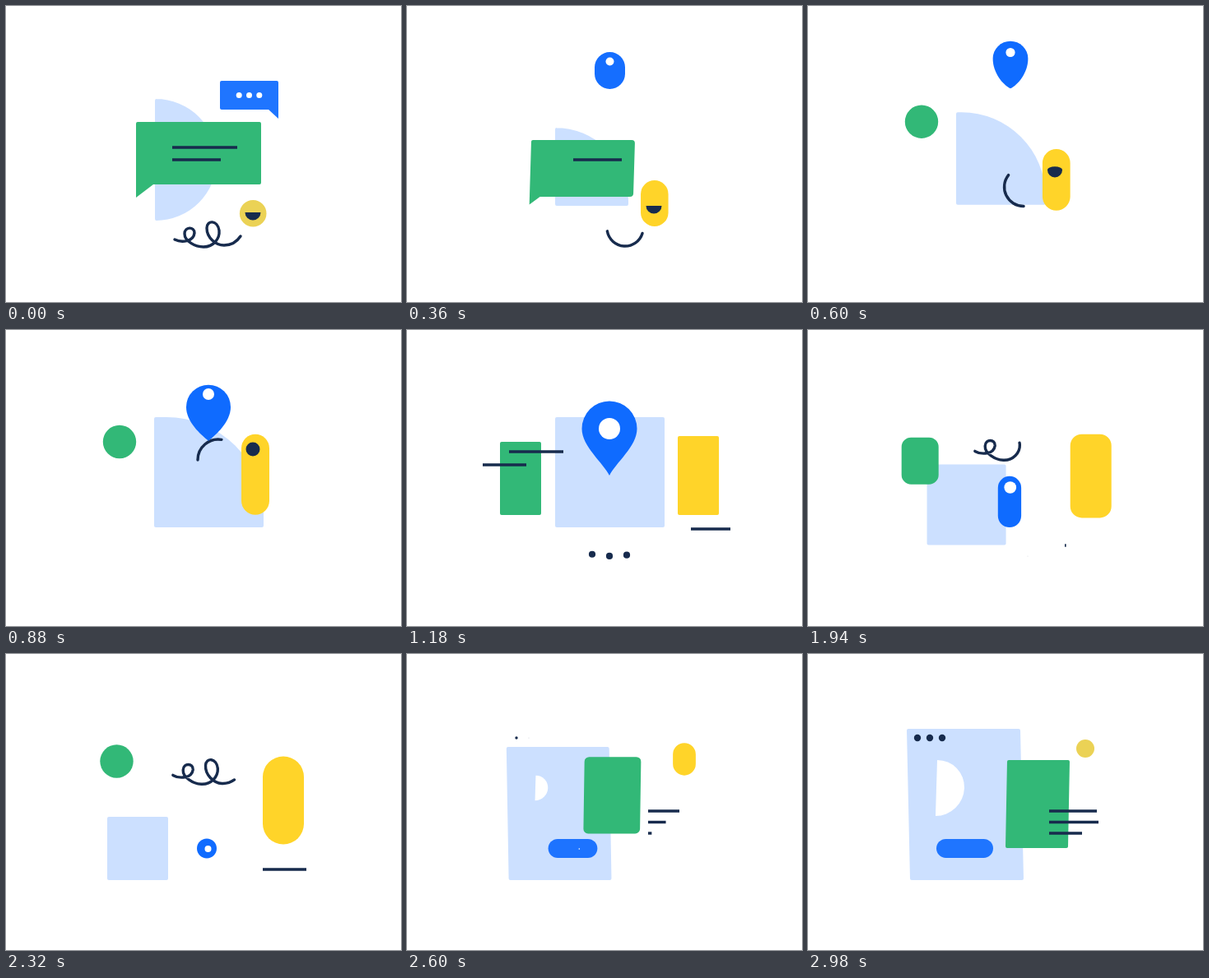
An HTML page for the animation above (3 s loop, 480 px wide and 360 px high).

```html
<!DOCTYPE html>
<html lang="en">
<head>
<meta charset="utf-8">
<title>Shape morph loop</title>
<style>
  html, body { margin: 0; width: 100%; height: 100%; overflow: hidden; background: #fff; }
  svg { display: block; width: 100vw; height: 100vh; }
  .ink { stroke: #172b4d; stroke-width: 3.4; fill: none; }
  .dark { fill: #172b4d; }
  .round { stroke-linecap: round; }
</style>
</head>
<body>
<svg id="stage" viewBox="0 0 480 360"></svg>
<script>
const LOOP = 3000;

// Every part moves between these beats; a pose is held from `from` to `to`.
const BEATS = {
  chat: { from: 0, to: 80 },
  lift: { from: 360, to: 360 },
  rise: { from: 550, to: 550 },
  drop: { from: 880, to: 880 },
  map: { from: 1150, to: 1520 },
  squeeze: { from: 1720, to: 1720 },
  rest: { from: 2150, to: 2360 },
  page: { from: 2700, to: LOOP }
};

const stage = document.getElementById('stage');
function set(el, attrs) {
  for (const key in attrs) el.setAttribute(key, attrs[key]);
}
function add(tag, attrs) {
  const el = document.createElementNS('http://www.w3.org/2000/svg', tag);
  set(el, attrs);
  return stage.appendChild(el);
}

const lerp = (a, b, u) => a + (b - a) * u;
function ramp(time, from, to) {
  const u = Math.min(1, Math.max(0, (time - from) / (to - from)));
  return u * u * (3 - 2 * u);
}
const rad = degrees => degrees * Math.PI / 180;
const polar = (x, y, r, degrees) => `${x + r * Math.cos(rad(degrees))} ${y + r * Math.sin(rad(degrees))}`;
const shear = (k, y) => `matrix(1 0 ${k} 1 ${-k * y} 0)`;

// Poses: centre, size and corners.
const card = (x, y, w, h, extra) =>
  ({ x, y, w, h, r: 2, tr: 2, br: 2, dip: 2, point: 0, tail: 0, skew: 0, ...extra });
const rounded = (x, y, w, h, r) => card(x, y, w, h, { r, tr: r, br: r, dip: r });
const pill = (x, y, w, h) => rounded(x, y, w, h, Math.min(w, h) / 2);
const disc = (x, y, r) => rounded(x, y, 2 * r, 2 * r, r);
const pin = (x, y, w, h, point) => ({ ...pill(x, y, w, h), dip: h - w / 2, point });

function poseAt(poses, time) {
  const names = Object.keys(poses);
  const next = names.findIndex(name => BEATS[name].from > time);
  if (next === 0) return poses[names[0]];
  if (next < 0) return poses[names[names.length - 1]];
  const a = poses[names[next - 1]], b = poses[names[next]];
  const u = ramp(time, BEATS[names[next - 1]].to, BEATS[names[next]].from);
  const mixed = {};
  for (const key in a) mixed[key] = lerp(a[key], b[key], u);
  return mixed;
}

const pale = {
  chat: card(218.5, 187, 75, 148, { tr: 74, br: 74 }),
  lift: card(224.5, 195.5, 89, 95, { tr: 89 }),
  drop: card(246.5, 173, 133, 134, { tr: 118 }),
  map: card(246.5, 173, 133, 134),
  squeeze: card(228, 186.5, 120, 121),
  rest: card(160, 236.5, 74, 77),
  page: card(191, 183, 138, 184, { skew: 0.022 })
};
const green = {
  chat: card(234, 179, 152, 76, { tail: 1 }),
  lift: card(213, 197.5, 126, 69, { tail: 0.6, tr: 4, br: 4, skew: -0.03 }),
  rise: disc(138, 141, 20.2),
  drop: disc(138, 136, 20.2),
  map: card(138, 180.5, 50, 89),
  squeeze: card(138, 190.5, 50, 75),
  rest: disc(134.5, 130.5, 20.2),
  page: card(279, 182.5, 76, 107, { skew: -0.019 })
};
const yellow = {
  chat: disc(300.2, 252.2, 16.3),
  lift: pill(300.8, 240, 33.5, 56),
  drop: pill(303, 175.8, 34, 98),
  map: card(354, 177, 50, 96),
  squeeze: card(351, 177, 50, 96),
  rest: pill(337, 178, 50, 107),
  page: disc(337, 115, 11)
};
const blue = {
  chat: card(295.5, 108.5, 71, 35, { tail: 1 }),
  lift: pill(246.5, 78.5, 37, 45),
  rise: pin(246, 69.5, 42, 57, 0.4),
  drop: pin(246, 100.7, 54, 68, 0.65),
  map: pin(246, 131.8, 67, 90.5, 1),
  squeeze: pill(246, 179, 33, 104),
  rest: disc(244, 236.5, 12),
  page: pill(190.5, 236.5, 69, 23)
};
const eye = {
  chat: disc(295.5, 108.5, 3.5),
  lift: disc(246.5, 67.5, 5),
  rise: disc(246, 55, 5.5),
  drop: disc(246, 78, 7),
  map: disc(246, 120, 13),
  squeeze: disc(246, 142, 11),
  rest: disc(245.5, 237, 4),
  page: disc(200, 237, 0)
};
const mouth = {
  chat: { x: 300, y: 251, r: 9.5, bulge: 0 },
  lift: { x: 300, y: 243, r: 9.5, bulge: 0 },
  drop: { x: 300, y: 145, r: 8.5, bulge: 1 },
  map: { x: 354, y: 145, r: 0, bulge: 1 }
};
const sweep = {
  lift: { x: 265, y: 270, r: 22, start: 17, end: 170 },
  drop: { x: 258, y: 158, r: 25, start: 180, end: 279 },
  map: { x: 250, y: 140, r: 25, start: 279, end: 279 }
};

// A line is revealed towards `dir` and later leaves the same way.
function line(x, y, width, dir, enter, leave) {
  return time => {
    const grown = ramp(time, enter, enter + 200);
    const gone = ramp(time, leave, leave + 160);
    const [a, b] = dir > 0 ? [gone, grown] : [1 - grown, 1 - gone];
    return b - a > 0.01 ? `M${x + width * a} ${y}H${x + width * b}` : '';
  };
}
const lines = [
  line(202, 172, 79, -1, -LOOP, 140),
  line(202, 187, 59, -1, -LOOP, 360),
  line(124, 148, 66, -1, 980, 1540),
  line(92, 164, 53, -1, 980, 1540),
  line(345, 242, 48, 1, 980, 1540),
  line(312, 262, 53, 1, 1920, 2400),
  ...[58, 60, 40].map((width, i) => line(293, 191 + 13.5 * i, width, 1, 2480 + 40 * i, LOOP))
];

const paleEl = add('path', { fill: '#cce0ff' });
const halfEl = add('path', { fill: '#fff' });
const greenEl = add('path', { fill: '#32b877' });
const yellowEl = add('path');
const mouthEl = add('path', { class: 'dark' });
const squiggleEl = add('path', {
  class: 'ink round', pathLength: 100,
  d: 'M205 284C213 288 228 287 229 276C229 268 217 268 217 277C217 286 230 293 240 293' +
     'C252 293 260 283 259 273C257 260 244 260 244 270C244 282 255 291 265 291C274 291 281 286 285 280'
});
const sweepEl = add('path', { class: 'ink round' });
const blueEl = add('path');
const whiteDots = [-1, 0, 1].map(() => add('circle', { fill: '#fff' }));
const darkDots = [0, 1, 2].map(() => add('circle', { class: 'dark' }));
const lineEls = lines.map(() => add('path', { class: 'ink' }));

const edges = p => ({ l: p.x - p.w / 2, r: p.x + p.w / 2, t: p.y - p.h / 2, b: p.y + p.h / 2 });
const corner = (radius, x, y) => `A${radius} ${radius} 0 0 1 ${x} ${y}`;

function drawBox(el, p) {
  const { l, r, t, b } = edges(p);
  const foot = p.tail > 0.02
    ? `H${l + 21 * p.tail}L${l} ${b + 16 * p.tail}`
    : `H${l + p.r}${corner(p.r, l, b - p.r)}`;
  set(el, {
    d: `M${l + p.r} ${t}H${r - p.tr}${corner(p.tr, r, t + p.tr)}V${b - p.br}${corner(p.br, r - p.br, b)}` +
       `${foot}V${t + p.r}${corner(p.r, l + p.r, t)}Z`,
    transform: shear(p.skew, p.y)
  });
}

// Rounded top, with a bottom that can taper to a point.
function drawBlue(time) {
  const p = poseAt(blue, time), { l, r, t, b } = edges(p);
  const shoulder = b - p.dip;
  const side = shoulder + p.dip * lerp(0.55, 0.38, p.point);
  const inset = p.r * lerp(0.45, 0.78, p.point);
  const low = b - p.dip * 0.27 * p.point;
  const tail = p.tail > 0.02 ? `M${r - 13} ${b - 1}V${b - 3}H${r}V${b + 11 * p.tail}Z` : '';
  const body = `M${l + p.r} ${t}H${r - p.r}${corner(p.r, r, t + p.r)}V${shoulder}` +
    `C${r} ${side} ${r - inset} ${low} ${r - p.r} ${b}H${l + p.r}` +
    `C${l + inset} ${low} ${l} ${side} ${l} ${shoulder}V${t + p.r}${corner(p.r, l + p.r, t)}Z`;
  const deep = ramp(time, 0, 600) - ramp(time, 2300, 2700);
  set(blueEl, { d: body + tail, fill: `rgb(${lerp(31, 15, deep)} ${lerp(117, 107, deep)} 255)` });

  const center = poseAt(eye, time);
  const spread = 1 - ramp(time, 80, 300);
  whiteDots.forEach((dot, i) => set(dot, {
    cx: center.x + (i - 1) * 12.3 * spread,
    cy: center.y,
    r: i === 1 ? center.r : 3.5 * spread
  }));
}

function drawYellow(time) {
  drawBox(yellowEl, poseAt(yellow, time));
  const muted = 1 - ramp(time, 0, 200) + ramp(time, 2600, LOOP);
  set(yellowEl, { fill: `rgb(${lerp(255, 235, muted)} ${lerp(212, 210, muted)} ${lerp(41, 85, muted)})` });
  const { x, y, r, bulge } = poseAt(mouth, time);
  set(mouthEl, {
    d: r > 0.1 ? `M${x - r} ${y}A${r} ${r} 0 0 0 ${x + r} ${y}A${r} ${r * bulge} 0 0 0 ${x - r} ${y}Z` : ''
  });
}

function drawSquiggle(time) {
  const again = time > BEATS.map.to;
  const from = again ? 100 * ramp(time, 2380, 2620) : 76 * ramp(time, 40, 360);
  const to = again ? 96 * ramp(time, 1700, 2120) : 100;
  const visible = to - from > 0.5 && (again || time < BEATS.lift.from);
  set(squiggleEl, {
    'stroke-dasharray': `${Math.max(0, to - from)} 300`,
    'stroke-dashoffset': -from,
    transform: again ? 'translate(-2 -134.5) rotate(3 245 280)' : '',
    visibility: visible ? 'visible' : 'hidden'
  });

  const { x, y, r, start, end } = poseAt(sweep, time);
  const sweeping = time >= BEATS.lift.from && time < BEATS.map.from;
  set(sweepEl, { d: sweeping ? `M${polar(x, y, r, start)}${'A'}${r} ${r} 0 0 1 ${polar(x, y, r, end)}` : '' });
}

function drawDarkDots(time) {
  const onPage = time > BEATS.rest.from;
  const phase = 38 + (time - 1180) * 0.433;
  darkDots.forEach((dot, i) => {
    const late = time - 40 * i;
    set(dot, onPage
      ? { cx: 133 + 15 * i, cy: 102, r: 4.2 * ramp(late, 2540, 2680) }
      : {
          cx: 225 + 21 * i,
          cy: 269 + 6 * Math.sin(rad(phase + 45 * i)),
          r: 4.1 * (ramp(late, 980, 1090) - ramp(late, 1740, 1880))
        });
  });
}

function drawHalf(time) {
  const r = 34 * ramp(time, 2480, 2740);
  set(halfEl, {
    d: r > 0.1 ? `M156 ${163 - r}${corner(r, 156, 163 + r)}Z` : '',
    transform: shear(-0.03, 163)
  });
}

function draw(time) {
  drawBox(paleEl, poseAt(pale, time));
  drawBox(greenEl, poseAt(green, time));
  drawHalf(time);
  drawYellow(time);
  drawSquiggle(time);
  drawBlue(time);
  drawDarkDots(time);
  lines.forEach((path, i) => set(lineEls[i], { d: path(time) }));
}

const start = performance.now();
function tick() {
  draw((performance.now() - start) % LOOP);
  requestAnimationFrame(tick);
}
tick();
</script>
</body>
</html>
```
